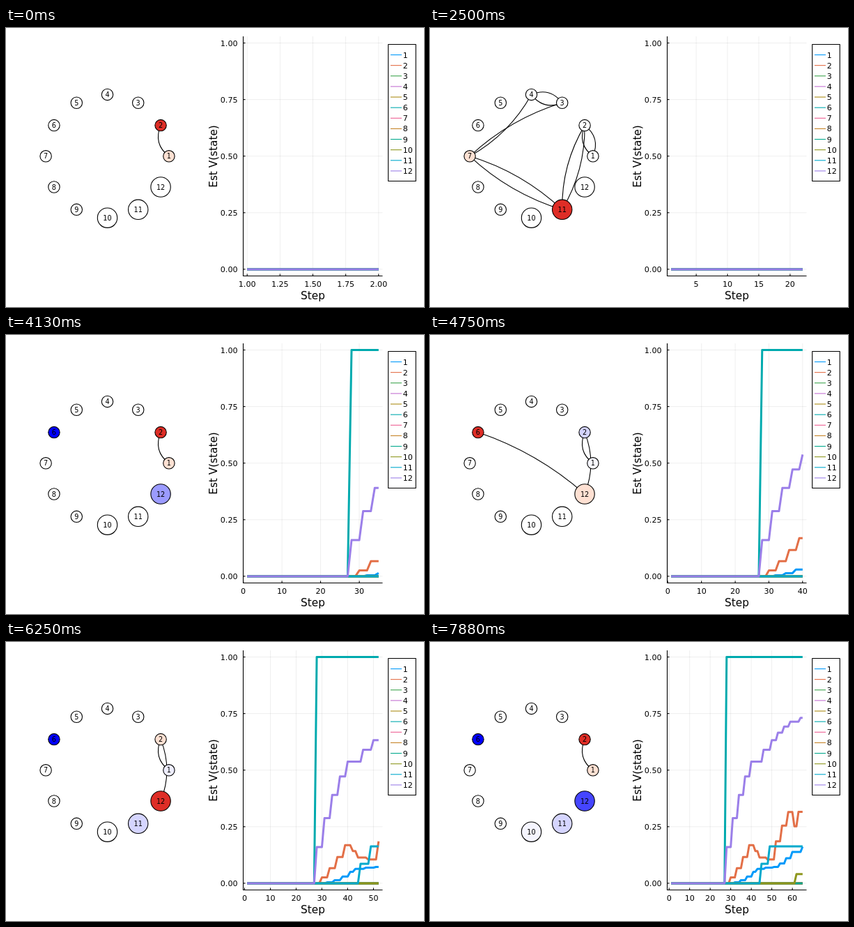
Animation, 600 px wide and 400 px high, one loop 8000 ms. Source, as an HTML page with a canvas:

```html
<!DOCTYPE html>
<html lang="en">
<head>
<meta charset="utf-8">
<title>State value learning</title>
<style>
html, body { margin: 0; width: 600px; height: 400px; overflow: hidden; background: #fff; }
canvas { display: block; }
</style>
</head>
<body>
<canvas id="stage" width="600" height="400"></canvas>
<script>
const ctx = document.getElementById("stage").getContext("2d");
const FONT = '"DejaVu Sans", sans-serif';
const STEP_MS = 125, LOOP_MS = 8000;
const GOAL = 6, RATE = 0.2, DISCOUNT = 0.8;

const COLORS = ["#009afa", "#e36f47", "#3da44e", "#c371d2", "#ac8e18", "#00aaae",
  "#ed5e93", "#c68225", "#00a98d", "#8e971e", "#00a9cc", "#9b7fe9"];

// Visited states, one string per episode
const direct = "1 2 12 6";
const EPISODES = [
  "1 2 11 2 11 7 11 7 3 4 3 4 3 4 7 11 2 1 2 11 7 11 2 10 2 11 12 6",
  direct, direct, direct, direct,
  "1 2 1 2 11 12 6",
  "1 2 11 12 6",
  direct, direct, direct,
  "1 2 10 2 12 6",
  "1 2"
].map(s => s.split(" ").map(Number));

// TD(0) run: history[n] holds the values and the path after step n + 1
function learn() {
  const values = new Array(13).fill(0);
  const history = [{ values: values.slice(), path: [1] }];
  for (const states of EPISODES) {
    for (let i = 1; i < states.length; i++) {
      const from = states[i - 1], to = states[i];
      if (to === GOAL) values[GOAL] = 1;
      values[from] += RATE * (DISCOUNT * values[to] - values[from]);
      history.push({ values: values.slice(), path: states.slice(0, i + 1) });
    }
  }
  return history;
}
const history = learn();

function line(x1, y1, x2, y2) {
  ctx.beginPath();
  ctx.moveTo(x1, y1);
  ctx.lineTo(x2, y2);
  ctx.stroke();
}

function pen(color, width) {
  ctx.strokeStyle = color;
  ctx.lineWidth = width;
}

function text(str, x, y, size, align) {
  ctx.font = size + "px " + FONT;
  ctx.textAlign = align;
  ctx.fillStyle = "#000";
  ctx.fillText(str, x, y);
}

// Graph
function place(state) {
  const a = (state - 1) * Math.PI / 6;
  return { x: 145.5 + 88.4 * Math.cos(a), y: 183.8 - 88.4 * Math.sin(a) };
}

function drawEdge(from, to) {
  const a = place(from), b = place(to);
  const dx = b.x - a.x, dy = b.y - a.y, len = Math.hypot(dx, dy);
  let nx = -dy / len, ny = dx / len;
  const flip = Math.abs(ny) < 1e-6 ? nx > 0 : ny > 0;
  if (flip) { nx = -nx; ny = -ny; }
  const bend = from > to ? 17.7 : -17.7;
  ctx.beginPath();
  ctx.moveTo(a.x, a.y);
  ctx.quadraticCurveTo((a.x + b.x) / 2 + nx * bend, (a.y + b.y) / 2 + ny * bend, b.x, b.y);
  ctx.stroke();
}

function drawGraph({ values, path }) {
  const now = path[path.length - 1], before = path[path.length - 2];
  const seen = new Set();
  pen("#000", 1.1);
  for (let i = 1; i < path.length; i++) {
    const key = path[i - 1] + "-" + path[i];
    if (!seen.has(key)) drawEdge(path[i - 1], path[i]);
    seen.add(key);
  }
  for (let s = 1; s <= 12; s++) {
    const p = place(s), c = Math.round(255 * (1 - values[s]));
    ctx.fillStyle = s === now ? "#de2d26" : s === before ? "#fee0d2" : `rgb(${c},${c},255)`;
    ctx.beginPath();
    ctx.arc(p.x, p.y, s > 9 ? 14.2 : 8.2, 0, 2 * Math.PI);
    ctx.fill();
    ctx.stroke();
    text(s, p.x, p.y + 3.6, 9.7, "center");
  }
}

// Chart
const LEFT = 340.5, RIGHT = 540.5, TOP = 12, BOTTOM = 355.5;
const yOf = v => 345.9 - 324.4 * v;

// Picks the best scoring tick spacing, trying wide ones first
function pickTicks(lo, hi) {
  const nice = [[5, 0.9], [3, 0.2], [2.5, 0.5], [2, 0.7], [1, 1]];
  let best = -1, result = null;
  for (const scale of [10, 1, 0.1]) {
    for (const [q, weight] of nice) {
      const step = q * scale;
      const first = Math.ceil(lo / step), count = Math.floor(hi / step) - first + 1;
      if (count < 4 || count > 8) continue;
      const score = (1 - Math.abs(count - 5) / 5) / 4 + (lo < step ? 1 / 6 : 0)
        + (hi - lo) / ((count - 1) * step) / 2 + weight / 4;
      if (score > best + 1e-9) {
        best = score;
        result = Array.from({ length: count }, (_, i) => (first + i) * step);
        result.digits = step % 1 === 0 ? 0 : step * 10 % 1 === 0 ? 1 : 2;
      }
    }
  }
  return result;
}

function drawAxes(ticks, xOf) {
  const levels = [0, 0.25, 0.5, 0.75, 1];
  pen("rgba(0,0,0,0.065)", 1);
  for (const t of ticks) line(xOf(t), TOP, xOf(t), BOTTOM);
  for (const v of levels) line(LEFT, yOf(v), RIGHT, yOf(v));
  pen("#000", 1.1);
  line(LEFT, TOP, LEFT, BOTTOM + 0.5);
  line(LEFT - 0.5, BOTTOM, RIGHT, BOTTOM);
  for (const t of ticks) {
    line(xOf(t), BOTTOM, xOf(t), BOTTOM - 3);
    text(t.toFixed(ticks.digits), xOf(t), 371, 11.1, "center");
  }
  for (const v of levels) {
    line(LEFT, yOf(v), LEFT + 3, yOf(v));
    text(v.toFixed(2), 332.5, yOf(v) + 4, 11.1, "right");
  }
  text("Step", 440.5, 389, 15.28, "center");
  ctx.save();
  ctx.translate(303, 184);
  ctx.rotate(-Math.PI / 2);
  text("Est V(state)", 0, 0, 15.28, "center");
  ctx.restore();
}

function drawChart(n) {
  const pad = 0.03 * (n - 1), lo = 1 - pad, hi = n + pad;
  const xOf = s => LEFT + (RIGHT - LEFT) * (s - lo) / (hi - lo);
  drawAxes(pickTicks(lo, hi), xOf);
  ctx.lineJoin = "round";
  for (let s = 1; s <= 12; s++) {
    pen(COLORS[s - 1], 3);
    ctx.beginPath();
    for (let i = 1; i <= n; i++) ctx.lineTo(xOf(i), yOf(history[i - 1].values[s]));
    ctx.stroke();
  }
}

function drawLegend() {
  pen("#000", 1.1);
  ctx.strokeRect(548.7, 23.5, 39.6, 196);
  COLORS.forEach((color, i) => {
    const y = 38.5 + 15.13 * i;
    pen(color, 1.1);
    line(552, y, 568, y);
    text(i + 1, 569.7, y + 4, 11.1, "left");
  });
}

function draw(time) {
  const n = Math.floor(time % LOOP_MS / STEP_MS) + 2;
  ctx.fillStyle = "#fff";
  ctx.fillRect(0, 0, 600, 400);
  drawGraph(history[n - 1]);
  drawChart(n);
  drawLegend();
}

const start = performance.now();
function tick() {
  draw(performance.now() - start);
  requestAnimationFrame(tick);
}
tick();
</script>
</body>
</html>
```
